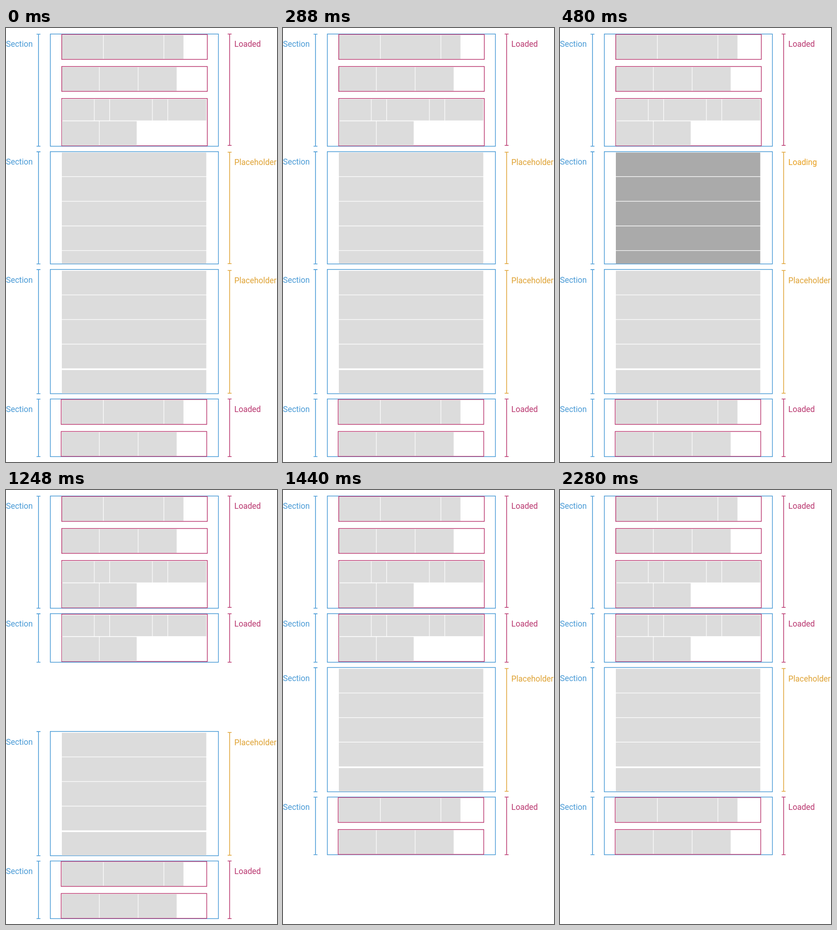
An HTML page for the animation above (2.84 s loop, 592 by 947 pixels).

```html
<!DOCTYPE html>
<html lang="en">
<head>
<meta charset="utf-8">
<title>Section loading</title>
<style>
html, body { margin: 0; width: 100%; height: 100%; overflow: hidden; background: #fff; }
svg { display: block; width: 100vw; height: 100vh; }
text { font: 400 17.5px Roboto, sans-serif; }
</style>
</head>
<body>
<svg id="stage" viewBox="0 0 592 947"></svg>
<script>
const BLUE = '#4a9bd6', PINK = '#b9376f', GOLD = '#dfa335', AMBER = '#e8a01f';
const GREY = '#dcdcdc', DARK = '#aaaaaa';
const LOOP = 2840, SHIFT = -139.5;

const WIDE = [[122, 212], [213.2, 344.3], [345.5, 387.7]];
const EVEN = [[122, 203.3], [204.5, 288], [289.2, 372.8]];
const MIXED = [[122, 192.3], [193.5, 225.8], [227, 319.2], [320.4, 352.8], [354, 437.5]];
const PAIR = [[122, 203.3], [204.5, 285.5]];

const frame = (x, y, w, bottom, color) =>
  `<rect x="${x}" y="${y}" width="${w}" height="${bottom - y}" fill="none" stroke="${color}" stroke-width="1.5"/>`;

const cells = (spans, top, bottom, fill = GREY) => spans.map(([a, b]) =>
  `<rect x="${a}" y="${top}" width="${b - a}" height="${bottom - top}" fill="${fill}"/>`).join('');

const bars = (rows, fill) =>
  rows.map(([top, bottom]) => cells([[122, 437.5]], top, bottom, fill)).join('');

const bracket = (x, top, bottom, color) =>
  `<path d="M${x - 4.3} ${top}h8.6M${x - 4.3} ${bottom}h8.6M${x} ${top}V${bottom}" fill="none" stroke="${color}" stroke-width="1.6"/>`;

const label = (x, y, str, color) => `<text x="${x}" y="${y}" fill="${color}">${str}</text>`;

const section = (top, bottom, base) =>
  frame(96.8, top, 367.2, bottom, BLUE) + bracket(71, top + .3, bottom, BLUE) + label(0, base, 'Section', BLUE);

const status = (top, bottom, base, str, color, ink = color) =>
  bracket(488.5, top, bottom, color) + label(498.8, base, str, ink);

const row = (x, y, spans) =>
  cells(spans, y + 1.5, y + 53.3) + frame(x, y, 318, y + 54.3, PINK);

const doubleRow = y =>
  frame(121.7, y, 318, y + 103.2, PINK) + cells(MIXED, y + 2, y + 48) + cells(PAIR, y + 49.6, y + 102.6);

const first = section(13.2, 258, 41.2) + row(121.7, 14.2, WIDE) + row(121.7, 84, EVEN) +
  doubleRow(153.8) + status(13.2, 256.3, 41.2, 'Loaded', PINK);

const waiting = (fill, str, ink) => section(269.8, 514.8, 298.2) +
  bars([[271.8, 323.7], [325, 377.5], [378.8, 431.2], [432.6, 485], [486.2, 514.2]], fill) +
  status(271, 514.3, 299.2, str, GOLD, ink);

const loaded = section(269.8, 375.8, 298.2) + doubleRow(271) +
  status(270, 375.8, 298.2, 'Loaded', PINK);

const lower = section(526.8, 798, 556.2) +
  bars([[529.8, 581.8], [583.1, 635.5], [636.8, 689], [690.4, 742.7], [746.3, 797.4]], GREY) +
  status(529, 797, 557.2, 'Placeholder', GOLD) +
  section(809.5, 935.3, 837.7) + row(120.5, 810.6, WIDE) + row(120.5, 880.4, EVEN) +
  status(809.5, 935.3, 837.7, 'Loaded', PINK);

const stage = document.getElementById('stage');
stage.innerHTML = first + '<g id="middle"></g><g id="lower">' + lower + '</g>';
const middle = document.getElementById('middle');
const tail = document.getElementById('lower');
const states = [waiting(GREY, 'Placeholder', GOLD), waiting(DARK, 'Loading', AMBER), loaded, loaded];

let shown = -1;
function draw(ms) {
  const step = Math.min(3, Math.floor((ms % LOOP) / 480));
  if (step === shown) return;
  shown = step;
  middle.innerHTML = states[step];
  tail.setAttribute('transform', `translate(0 ${step === 3 ? SHIFT : 0})`);
}

const start = performance.now();
function tick() {
  draw(performance.now() - start);
  requestAnimationFrame(tick);
}
tick();
</script>
</body>
</html>
```
